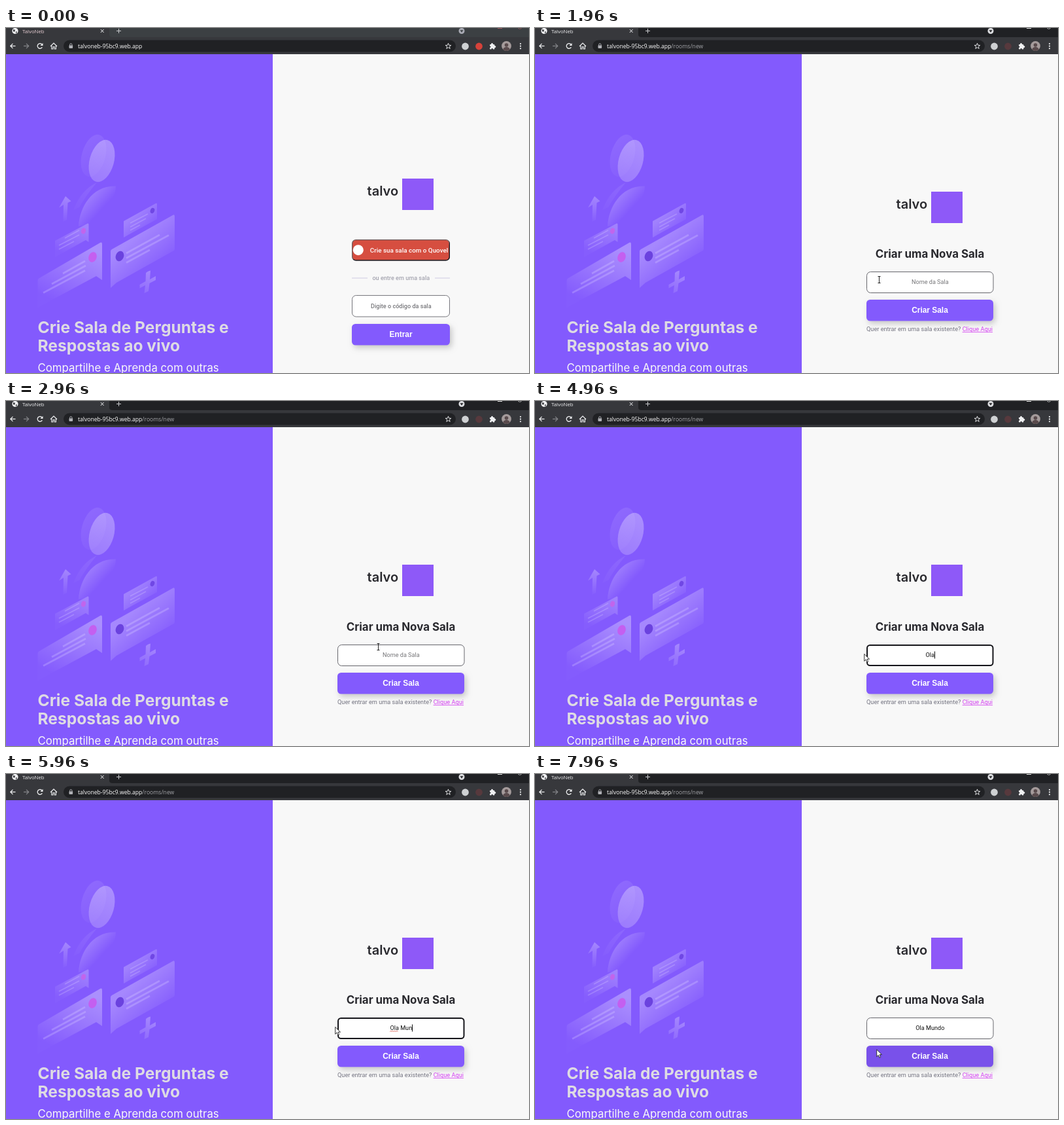
These frames come from a looping animation (800x527 px, 8 s). An HTML page with a canvas:

```html
<!DOCTYPE html>
<html lang="pt-BR">
<head>
<meta charset="utf-8">
<title>TalvoNeb</title>
<style>
html, body { margin: 0; width: 100%; height: 100%; overflow: hidden; background: #f8f8f8; }
canvas { display: block; width: 800px; height: 527px; }
</style>
</head>
<body>
<canvas id="stage" width="800" height="527"></canvas>
<script>
const ctx = document.getElementById('stage').getContext('2d');
const LOOP = 8000;
const PURPLE = '#835afd';
const UI = '"Open Sans", "Noto Sans", sans-serif';
const BODY = 'Roboto, Arial, sans-serif';
const HEAD = 'Inter, sans-serif';
const BUTTON = '"Liberation Sans", Arial, sans-serif';

const white = a => `rgba(255,255,255,${a})`;

function text(str, x, y, font, color, align = 'left') {
  ctx.font = font;
  ctx.fillStyle = color;
  ctx.textAlign = align;
  ctx.fillText(str, x, y);
  return ctx.measureText(str).width;
}

function rect(x, y, w, h, color) {
  ctx.fillStyle = color;
  ctx.fillRect(x, y, w, h);
}

function round(x, y, w, h, r, fill, stroke, width = 1) {
  ctx.beginPath();
  ctx.roundRect(x, y, w, h, r);
  if (fill) { ctx.fillStyle = fill; ctx.fill(); }
  if (stroke) { ctx.strokeStyle = stroke; ctx.lineWidth = width; ctx.stroke(); }
}

function oval(x, y, rx, ry, tilt, fill) {
  ctx.beginPath();
  ctx.ellipse(x, y, rx, ry, tilt, 0, Math.PI * 2);
  ctx.fillStyle = fill;
  ctx.fill();
}

const disc = (x, y, r, fill) => oval(x, y, r, r, 0, fill);

function line(pts, color, width = 1) {
  ctx.beginPath();
  for (let i = 0; i < pts.length; i += 2) ctx.lineTo(pts[i], pts[i + 1]);
  ctx.strokeStyle = color;
  ctx.lineWidth = width;
  ctx.stroke();
}

function shape(path, fill, stroke, width = 1) {
  const p = new Path2D(path);
  ctx.fillStyle = fill;
  ctx.fill(p);
  if (stroke) { ctx.strokeStyle = stroke; ctx.lineWidth = width; ctx.stroke(p); }
}

function fade(x0, y0, x1, y1, a0, a1) {
  const g = ctx.createLinearGradient(x0, y0, x1, y1);
  g.addColorStop(0, white(a0));
  g.addColorStop(1, white(a1));
  return g;
}

function drawTabs(room) {
  const ink = '#f0f1f3';
  const strip = room ? '#202124' : '#3c4043';
  rect(0, 0, 800, 15, strip);
  shape('M0 0H158V10Q158 14 163 14V16H0Z', '#37383c');
  disc(14, 4.5, 4.6, ink);
  shape('M11 2l3 1l-1 3l-2-1zM15 5l2 1l-2 3z', '#37383c');
  text('TalvoNeb', 25, 7.5, `7.8px ${UI}`, room ? '#eeeff0' : '#e8ced3');
  line([144.8, 2, 149.6, 7], ink);
  line([149.6, 2, 144.8, 7], ink);
  line([169, 4.5, 176, 4.5], '#c8c9cc');
  line([172.5, 1, 172.5, 8], '#c8c9cc');
  disc(697, 4.5, 4.5, room ? '#dcdde0' : '#a9aab4');
  shape('M694.5 3.2h5l-2.5 3.6z', strip);
  const win = room ? '#e0e0e0' : '#a35a60';
  line([752, 0.5, 759, 0.5], win);
  line([783.5, 0, 785.5, 1.5], win);
  line([788.5, 0, 786.5, 1.5], win);
}

function drawToolbar(room) {
  const ink = '#f0f1f3';
  rect(0, 14, 800, 26, '#37383c');
  line([14.5, 27.5, 7, 27.5], ink, 1.2);
  line([10.5, 23.8, 6.8, 27.5, 10.5, 31.2], ink, 1.2);
  line([27, 27.5, 34.5, 27.5], '#85868a', 1.2);
  line([31, 23.8, 34.7, 27.5, 31, 31.2], '#85868a', 1.2);
  ctx.beginPath();
  ctx.arc(52, 27.5, 3.8, 0.5, 5.5);
  ctx.strokeStyle = ink;
  ctx.lineWidth = 1.3;
  ctx.stroke();
  shape('M56.5 23v4h-4z', ink);
  line([68, 28, 73, 23, 78, 28], ink, 1.2);
  line([69.8, 27, 69.8, 32, 72, 32, 72, 28.8, 74.2, 28.8, 74.2, 32, 76.4, 32, 76.4, 27], ink, 1.1);

  round(88, 18.5, 600, 18, 9, '#202124');
  round(96.5, 26.5, 5.6, 4.6, 0.8, '#b0b1b6');
  round(97.6, 23.8, 3.4, 5, 1.7, null, '#b0b1b6');
  const w = text('talvoneb-95bc9.web.app', 110, 31, `500 8.6px ${UI}`, '#fff');
  if (room) text('/rooms/new', 110 + w, 31, `8.65px ${UI}`, '#a3a4a9');

  let star = '';
  for (let i = 0; i < 10; i++) {
    const r = i % 2 ? 1.9 : 4.6, a = i * Math.PI / 5 - Math.PI / 2;
    star += `${i ? 'L' : 'M'}${676.5 + r * Math.cos(a)} ${27.8 + r * Math.sin(a)}`;
  }
  shape(star + 'Z', '#202124', ink, 0.9);

  disc(702.5, 28, 5.4, '#cfd1d3');
  disc(723.5, 28, 5.4, room ? '#57393d' : '#d6423a');
  round(740, 25, 7.4, 7.4, 1, ink);
  disc(743.5, 24.7, 1.6, ink);
  disc(747.7, 28.6, 1.6, ink);
  disc(740.2, 28.8, 1.2, '#37383c');
  disc(743.7, 32.2, 1.2, '#37383c');

  ctx.save();
  ctx.beginPath();
  ctx.arc(765.5, 27.5, 7.4, 0, 7);
  ctx.clip();
  rect(758, 20, 16, 16, '#a59b9b');
  disc(765.5, 26, 2.8, '#594a4c');
  oval(765.5, 34, 5.5, 5, 0, '#594a4c');
  ctx.restore();
  for (let i = -1; i < 2; i++) disc(787, 27.7 + i * 3.6, 1.1, ink);
}

function drawCard(path, fill, dot, dotColor, r, lines, width) {
  shape(path, fill);
  for (const l of lines) line(l, white(0.19), width);
  oval(dot[0], dot[1], r, r * 1.32, 0.35, dotColor);
}

function drawArt() {
  // Person
  oval(134, 195, 18, 33, 0.27, fade(116, 175, 150, 225, 0.09, 0.02));
  oval(146.5, 203, 18.6, 33, 0.27, fade(163, 175, 128, 232, 0.32, 0.2));
  shape('M103 278Q115 247 139 236Q125 252 112 274Z', fade(125, 240, 105, 278, 0.07, 0.02));
  shape('M111 303C112 274 132 240 168 241.5C167 263 155 284 138 298Z',
    fade(126, 256, 148, 276, 0.22, 0));
  // Arrow
  shape('M91 257L99.5 264.5L94.5 267L93 293L87.5 296L88 270L81 274.5Z',
    fade(92, 257, 89, 296, 0.27, 0.02));

  drawCard('M75 325L125 298.5Q126.5 298 126.5 300V327L122 324L75 350Z',
    fade(112, 299, 92, 346, 0.24, 0.02), [118.5, 310], '#c165ed', 3.4,
    [[90, 321, 112, 309], [81, 332, 112, 316], [81, 338, 104, 326]], 1.6);
  drawCard('M180 295L229 268Q231 267 231 269V292L187 316L180 320Z',
    fade(195, 287, 217, 311, 0.24, 0.02), [224, 279], '#7047e5', 3.2,
    [[190, 298, 217, 284], [190, 304, 214, 291], [190, 309, 205, 301]], 1.6);
  drawCard('M48.5 386Q48.5 383 51 382L144 328Q147 326.5 147 330V385L138 379L48.5 427Z',
    fade(124, 333, 79, 420, 0.32, 0.01), [132.5, 350], '#c45ff0', 6.1,
    [[87, 375, 121, 356], [70, 391, 122, 363], [57, 404.5, 121, 370.5]], 2.7);
  drawCard('M160 341Q160 339 162 338L255 286Q258 284 258 288V337Q258 340 255 341L169 389L160 397Z',
    fade(190, 325, 232, 372, 0.28, 0.02), [174, 348.5], '#6b42df', 6.1,
    [[184, 344, 235, 316], [184, 351.5, 249, 316.5], [184, 358.5, 220, 339]], 2.7);
  // Plus
  shape('M214 374Q217 371 221 370.5L220 384L229 379V385L219.5 390L218 402L211.5 405L213 393L204.5 397.5V392L213.5 387Z',
    fade(221, 371, 208, 404, 0.28, 0.1));
}

function drawLeft() {
  rect(0, 40, 408, 487, PURPLE);
  drawArt();
  const bold = `bold 24.6px ${HEAD}`;
  text('Crie Sala de Perguntas e', 48.5, 466, bold, '#dedbe3');
  text('Respostas ao vivo', 48.5, 493.5, bold, '#dedbe3');
  text('Compartilhe e Aprenda com outras', 48.5, 525, `16.8px ${HEAD}`, '#f8f8f8');
}

function drawBrand(y) {
  text('talvo', 552.5, y + 26, `600 20px ${HEAD}`, '#29292e');
  rect(606, y, 48, 48, '#8e59f8');
}

function drawButton(label, x, y, w, fill) {
  ctx.save();
  ctx.shadowColor = 'rgba(0,0,0,0.2)';
  ctx.shadowBlur = 9;
  ctx.shadowOffsetX = 3;
  ctx.shadowOffsetY = 4;
  round(x, y, w, 32.5, 5.5, fill);
  ctx.restore();
  text(label, 604, y + 20, `bold 11.9px ${BUTTON}`, '#fff', 'center');
}

// Bevelled frame: light from the top left
function drawOutset(x, y, w, h, r, fill) {
  round(x, y, w, h, r, fill, '#6f5c5c', 1.3);
  ctx.save();
  ctx.clip(new Path2D(`M${x - 1} ${y + h + 1}l${r + 1} ${-r - 1}H${x + w - r}L${x + w + 1} ${y - 1}V${y + h + 1}Z`));
  round(x, y, w, h, r, null, '#17131a', 1.3);
  ctx.restore();
}

function drawHome(hover) {
  drawBrand(230);
  drawOutset(529.65, 323.65, 148.7, 31.3, 5.5, hover ? '#bf4538' : '#d64e40');
  const ink = hover ? '#e5dcda' : '#fff';
  disc(538.8, 339.2, 8, ink);
  text('Crie sua sala com o Quovel', 556.8, 343, `500 9.85px ${BODY}`, ink);

  rect(529, 381.5, 24, 1, '#cfcbe4');
  rect(656, 381.5, 23, 1, '#cfcbe4');
  text('ou entre em uma sala', 604.3, 385, `500 9.1px ${BODY}`, '#a5a5b0', 'center');
  round(529.5, 408.5, 149, 32.5, 6, '#fff', '#77777d');
  text('Digite o código da sala', 604.3, 428, `500 9.1px ${BODY}`, '#77777b', 'center');
  drawButton('Entrar', 529, 452, 150, PURPLE);
}

function drawField({ typed = '', focus, caret, marked }) {
  if (focus) round(508, 373, 192.5, 31, 4.5, '#fff', '#15151a', 2);
  else round(507.5, 372.5, 193.5, 32, 6, '#fff', '#66666c');
  if (!typed) {
    text('Nome da Sala', 604.3, 391, `9.15px ${BODY}`, '#757578', 'center');
    return;
  }
  const w = text(typed, 604.3, 391, `9.15px ${BODY}`, '#111', 'center');
  const left = 604.3 - w / 2;
  if (caret) rect(Math.round(left + w), 382.5, 1, 11, '#111');
  if (marked) {
    const end = left + ctx.measureText('Ola').width;
    const wave = [];
    for (let x = left, i = 0; x <= end; x += 1.5, i++) wave.push(x, i % 2 ? 392.3 : 393.6);
    line(wave, '#d8503f', 0.8);
  }
}

function drawRoom(state) {
  drawBrand(250);
  text('Criar uma Nova Sala', 604, 350.5, `bold 16.9px ${HEAD}`, '#29292e', 'center');
  drawField(state);
  drawButton('Criar Sala', 507, 415, 194, state.hover ? '#7951ea' : PURPLE);
  const font = `9.2px ${BODY}`;
  const x = 507 + text('Quer entrar em uma sala existente? ', 507, 463, font, '#737380');
  const w = text('Clique Aqui', x, 463, font, '#d23cf0');
  rect(x, 464, w, 0.8, '#d23cf0');
}

const cursors = {
  arrow() {
    shape('M0 0V10.8L2.5 8.4L4.2 12.3L6 11.5L4.4 7.7H7.8Z', '#fff', '#222', 0.9);
  },
  hand() {
    shape('M-1.2 1Q0 -1 1.2 1V5L5 5.8Q6.4 6.2 6.2 8L5 13.5H-1L-4.3 8.6Q-4.2 6.6 -2.6 7.6L-1.2 8.8Z',
      '#fff', '#222', 0.9);
    line([1.2, 5, 1.2, 8], '#222', 0.7);
    line([3.4, 5.6, 3.4, 8], '#222', 0.7);
  },
  beam() {
    line([0.5, -5, 0.5, 5], '#222');
    line([-1.5, -5, 2.5, -5], '#222');
    line([-1.5, 5, 2.5, 5], '#222');
  }
};

const steps = [
  { at: 0 },
  { at: 1000, hover: true, cursor: ['hand', 570, 343.5] },
  { at: 1960, room: true, cursor: ['beam', 526, 384.5] },
  { at: 2960, room: true, cursor: ['beam', 569, 375.5] },
  { at: 3960, room: true, focus: true, cursor: ['arrow', 503.7, 386.5] },
  { at: 4960, room: true, focus: true, typed: 'Ola', caret: true, cursor: ['arrow', 503.7, 386.5] },
  { at: 5960, room: true, focus: true, typed: 'Ola Mun', caret: true, marked: true, cursor: ['arrow', 503.7, 386.5] },
  { at: 6960, room: true, focus: true, typed: 'Ola Mundo', marked: true, cursor: ['arrow', 493.7, 400.5] },
  { at: 7960, room: true, typed: 'Ola Mundo', hover: true, cursor: ['arrow', 522.7, 421] }
];

function draw(t) {
  const state = steps.findLast(s => s.at <= t);
  rect(0, 0, 800, 527, '#f8f8f8');
  drawTabs(state.room);
  drawToolbar(state.room);
  drawLeft();
  if (state.room) drawRoom(state);
  else drawHome(state.hover);
  if (state.cursor) {
    const [kind, x, y] = state.cursor;
    ctx.save();
    ctx.translate(x, y);
    cursors[kind]();
    ctx.restore();
  }
}

const start = performance.now();
function tick() {
  draw((performance.now() - start) % LOOP);
  requestAnimationFrame(tick);
}
tick();
</script>
</body>
</html>
```
